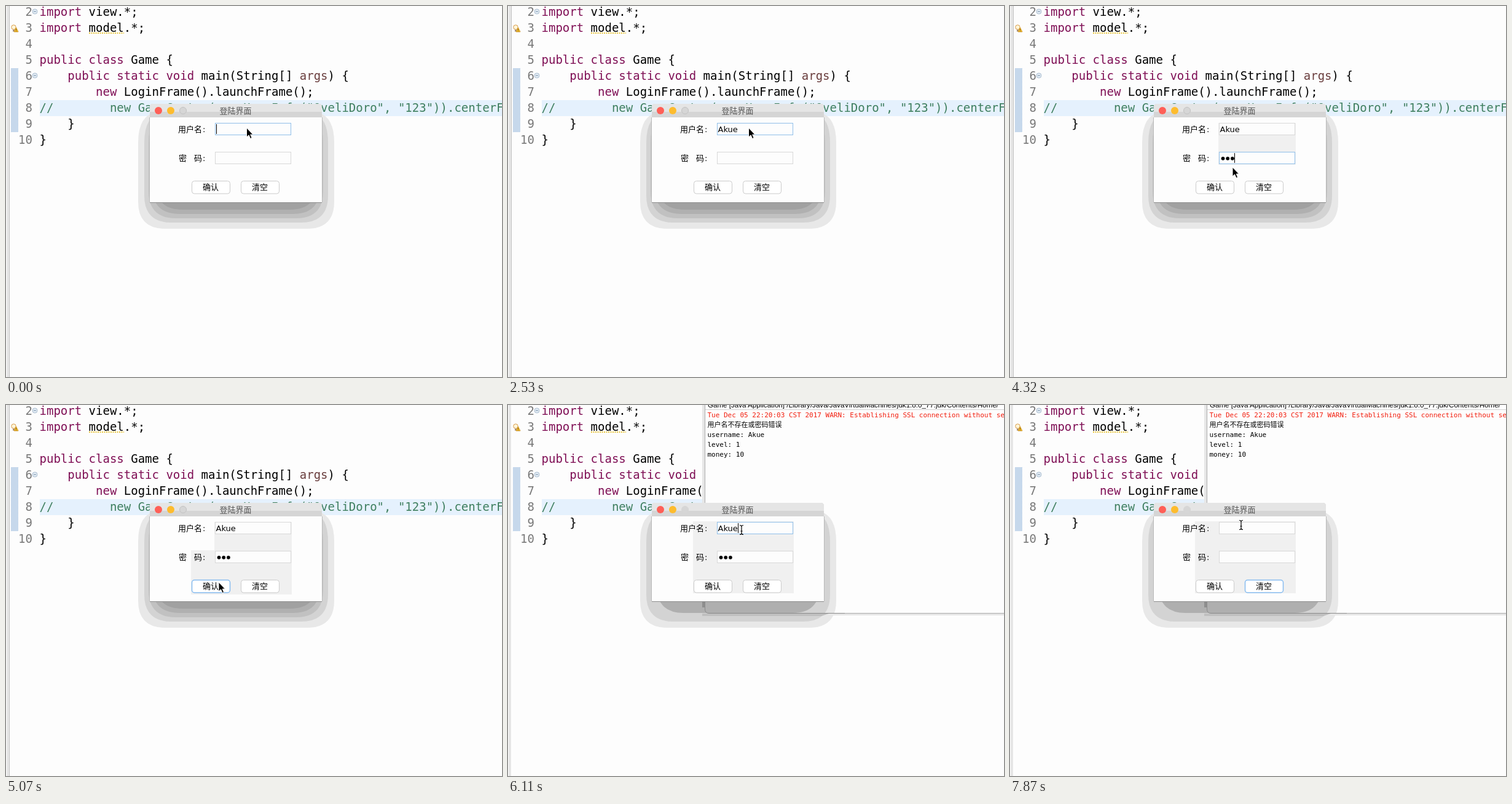
Recreate the animation shown at these times as an HTML page. Size 807 px wide and 603 px high, loop 8000 ms.

```html
<!DOCTYPE html>
<html lang="zh">
<head>
<meta charset="utf-8">
<title>Login dialog</title>
<style>
  html, body { margin: 0; width: 100%; height: 100%; overflow: hidden; background: #fdfdfd; }
  svg { display: block; width: 807px; height: 603px; }
  text { white-space: pre; }
  .code { font: 19px "DejaVu Sans Mono", monospace; fill: #000; }
  .num { fill: #787878; text-anchor: end; }
  .key { fill: #7f0f55; }
  .arg { fill: #6a3e3e; }
  .note { fill: #3f7f5f; }
  .log { font: 11px "DejaVu Sans Mono", "Noto Sans CJK SC", monospace; }
  .path { font: 11.6px "Liberation Sans", sans-serif; }
  .ui { font: 13px "DejaVu Sans", "Noto Sans CJK SC", sans-serif; }
  .cjk { font: 13px "Noto Sans CJK SC", "Noto Sans CJK", sans-serif; }
  .mid { text-anchor: middle; }
  .field { fill: #fdfdfd; stroke: #d8d8d8; }
  .field.focus { stroke: #90bfe9; }
  .button { fill: #fff; stroke: #cbcbcb; }
  .button.focus { stroke: #86bcf0; stroke-width: 1.5; }
</style>
</head>
<body>
<svg viewBox="0 0 807 603">
  <defs>
    <pattern id="hatch" width="2" height="2" patternUnits="userSpaceOnUse">
      <path fill="#e0eaf5" d="M0 0h2v2H0z"/>
      <path fill="#acc6e2" d="M0 0h1v1H0zM1 1h1v1H1z"/>
    </pattern>
    <g id="fold">
      <circle r="4" fill="#e4edf5" stroke="#a9bccf"/>
      <path d="M-2 0H2" stroke="#6f8aa6"/>
    </g>
  </defs>

  <rect width="807" height="603" fill="#fdfdfd"/>
  <rect x="1" width="4" height="603" fill="#e6e6e6"/>
  <rect id="edge" x="5" width="1" height="603" fill="#c2c2c2"/>
  <rect x="8" y="101" width="12" height="104" fill="url(#hatch)"/>
  <rect x="55" y="153" width="752" height="26" fill="#e5f1fd"/>
  <g id="code"></g>
  <path d="M135 44H192" stroke="#e8c53c" stroke-width="2" stroke-dasharray="2 1.5"/>
  <use href="#fold" x="47" y="9"/>
  <use href="#fold" x="47" y="113"/>
  <g transform="translate(8 30)">
    <circle cx="4.500" cy="4.500" r="3.700" fill="#fff6d8" stroke="#d99a4a"/>
    <path d="M3 8.500h3v3h-3z" fill="#a98e78"/>
    <path d="M8.500 5L12 12H5Z" fill="#f6c22f" stroke="#c48713" stroke-width=".8"/>
    <path d="M8.500 7.500v2M8.500 10.500v1" stroke="#6a4a00"/>
  </g>

  <g id="console">
    <path d="M316 0H807V342H316Z" fill="#e6e6e6"/>
    <path d="M320.500 -1V332Q320.500 338.500 327 338.500H808V-1Z" fill="#fdfdfd" stroke="#adadad"/>
    <text class="path" x="325" y="4">Game [Java Application] /Library/Java/JavaVirtualMachines/jdk1.8.0_77.jdk/Contents/Home/</text>
    <path d="M321 7.500H807" stroke="#d4d4d4"/>
    <g id="log"></g>
  </g>

  <g id="shadow"></g>
  <g id="overlap">
    <path d="M316 319h4v10h-4z" fill="#8e8e8e"/>
    <path d="M320.500 319V332Q320.500 338.500 327 338.500H548" fill="none" stroke="#8c8c8c"/>
    <path d="M316 339H522L510 343H316Z" fill="#bfbfbf"/>
  </g>

  <path d="M234 319V164Q234 159 239 159H509Q514 159 514 164V319Z" fill="#fdfdfd"/>
  <path d="M234 181V164Q234 159 239 159H509Q514 159 514 164V181Z" fill="#d5d5d5"/>
  <path d="M234 172V164Q234 159 239 159H509Q514 159 514 164V172Z" fill="#e5e5e5"/>
  <path d="M234 319.500H514" stroke="#8d8d8d"/>
  <path d="M233.500 181V319M514.500 181V319" stroke="#b9b9b9"/>
  <circle cx="248" cy="170" r="6" fill="#ff5f57"/>
  <circle cx="268" cy="170" r="6" fill="#fdbc2e"/>
  <circle id="zoom" cx="288" cy="170" r="5.500" fill="#d6d6d6" stroke="#c2c2c2"/>
  <text class="cjk mid" x="373.500" y="175" fill="#555">登陆界面</text>

  <path id="patch" fill="#f0f0f0"/>
  <text class="cjk" x="280" y="205">用户名</text>
  <text class="cjk" x="281" y="252">密</text>
  <text class="cjk" x="306" y="252">码</text>
  <text class="ui" x="320" y="205">:</text>
  <text class="ui" x="320" y="252">:</text>
  <rect id="user" class="field" x="340.500" y="190.500" width="123" height="19"/>
  <rect id="pass" class="field" x="340.500" y="237.500" width="123" height="19"/>
  <rect id="ok" class="button" x="302.500" y="284.500" width="62" height="20.500" rx="4"/>
  <rect id="clear" class="button" x="382.500" y="284.500" width="62" height="20.500" rx="4"/>
  <text class="cjk mid" x="333" y="299">确认</text>
  <text class="cjk mid" x="413" y="299">清空</text>
  <text id="name" class="ui" x="341.500" y="205"></text>
  <g id="dots">
    <circle cx="346.500" cy="247.800" r="2.900"/>
    <circle cx="354.200" cy="247.800" r="2.900"/>
    <circle cx="361.900" cy="247.800" r="2.900"/>
  </g>
  <rect id="caret" width="1" height="16"/>
  <path id="arrow" d="M0 0V15L3.600 11.800L6 17.500L8.600 16.400L6.200 11H10.500Z" stroke="#fff"/>
  <path id="beam" d="M-3 -7.500Q0 -7.500 0 -5.500Q0 -7.500 3 -7.500M0 -5.500V5.500M-3 7.500Q0 7.500 0 5.500Q0 7.500 3 7.500M-1.500 2H1.500" fill="none" stroke="#000" stroke-width="1.200"/>
</svg>

<script>
const LOOP = 8000, USER = "Akue";
const $ = id => document.getElementById(id);
const show = (id, on) => $(id).style.display = on ? "" : "none";

// Token marks: {k keyword}, {a argument}, {n comment}
const code = [
  "{kimport} view.*;", "{kimport} model.*;", "", "{kpublic class} Game {",
  "    {kpublic static void} main(String[] {aargs}) {",
  "        {knew} LoginFrame().launchFrame();",
  '{n//        new GameCenter(new UserInfo("OveliDoro", "123")).centerFrame();}',
  "    }", "}"
];
const kinds = { k: "key", a: "arg", n: "note" };
$("code").innerHTML = code.map((line, i) => {
  const y = 16 + i * 26;
  const body = line.replace(/\{([kan])([^}]+)\}/g, (_, k, s) => `<tspan class="${kinds[k]}">${s}</tspan>`);
  return `<text class="code num" x="43" y="${y}">${i + 2}</text><text class="code" x="54.5" y="${y}">${body}</text>`;
}).join("");

$("log").innerHTML = [
  "Tue Dec 05 22:20:03 CST 2017 WARN: Establishing SSL connection without server's",
  "用户名不存在或密码错误", "username: " + USER, "level: 1", "money: 10"
].map((s, i) => `<text class="log" x="324.500" y="${20 + i * 16}" fill="${i ? "#000" : "#f21d0d"}">${s}</text>`).join("");

// Shadow bands: left, right, bottom, colour
const outer = [[215, 534, 362, "#e8e8e8"], [225, 524, 352, "#d3d3d3"]];
const deep = [[232, 516, 345, "#c1c1c1"], [238, 511, 338, "#b0b0b0"], [243, 506, 331, "#a1a1a1"]];
const flat = [[242, 507, 338, "#afafaf"]];
const bands = list => list.map(([l, r, b, fill]) =>
  `<path fill="${fill}" d="M${l} 222Q${l} 176 ${l + 32} 172H${r - 32}Q${r} 176 ${r} 222V${b - 44}Q${r} ${b} ${r - 44} ${b}H${l + 44}Q${l} ${b} ${l} ${b - 44}Z"/>`).join("");
const shadows = { false: bands([...outer, ...deep]), true: bands([...outer, ...flat]) };

const arrow = (x, y) => ({ pointer: "arrow", x, y });
const beam = (x, y) => ({ pointer: "beam", x, y });

// Grey repaint areas behind the controls
const fields = "M339 190h126v68h-126z";
const lower = "M301 236h164v72h-164z";
const whole = "M301 189h164v117h-164z";

// Each step overrides part of the state from its time on
const steps = [
  [0, { typed: 0, dots: 0, focus: "user", caret: true, patch: "", console: false, ...arrow(391.5, 198) }],
  [450, { caret: false }],
  [1050, { caret: true }],
  [1490, { typed: 1 }],
  [1790, { typed: 2 }],
  [1940, { typed: 3 }],
  [2080, { typed: 4 }],
  [2530, { caret: false }],
  [2680, { focus: "pass", caret: true, patch: fields }],
  [3130, { caret: false }],
  [3580, { dots: 1, caret: true }],
  [3720, { dots: 2 }],
  [4020, { dots: 3 }],
  [4170, arrow(384, 222)],
  [4320, arrow(362, 262)],
  [4470, arrow(348, 286)],
  [4620, { focus: "ok", caret: false, patch: fields + lower, ...arrow(346, 288) }],
  [5220, { console: true, patch: "", ...arrow(343, 288) }],
  [5370, arrow(345, 284)],
  [5520, arrow(355, 263)],
  [5670, arrow(368, 228)],
  [5820, beam(378, 206)],
  [5970, beam(380, 203)],
  [6110, { focus: "user", caret: true, patch: whole }],
  [6250, beam(381, 204)],
  [6400, beam(383, 207)],
  [6540, { caret: false, ...arrow(386, 220) }],
  [6690, arrow(393, 243)],
  [6840, arrow(400, 266)],
  [6980, arrow(406, 283)],
  [7130, arrow(409, 290)],
  [7270, arrow(409, 291)],
  [7420, { typed: 0, dots: 0, focus: "clear" }],
  [7570, arrow(402, 268)],
  [7720, arrow(386, 219)],
  [7870, beam(376, 195)]
];

let lastState = "";
function draw(now) {
  const time = now % LOOP;
  const s = Object.assign({}, ...steps.filter(([t]) => t <= time).map(step => step[1]));
  const key = JSON.stringify(s);
  if (key === lastState) return;
  lastState = key;

  $("name").textContent = USER.slice(0, s.typed);
  [...$("dots").children].forEach((dot, i) => dot.style.display = i < s.dots ? "" : "none");
  for (const id of ["user", "pass", "ok", "clear"]) $(id).classList.toggle("focus", s.focus === id);
  $("patch").setAttribute("d", s.patch);

  const inUser = s.focus === "user";
  const offset = inUser ? (s.typed ? $("name").getComputedTextLength() : 0) : s.dots * 7.8;
  $("caret").setAttribute("x", Math.round(342 + offset));
  $("caret").setAttribute("y", inUser ? 192 : 239);
  show("caret", s.caret);

  show("console", s.console);
  show("overlap", s.console);
  show("edge", !s.console);
  $("zoom").setAttribute("stroke", s.console ? "#d6d6d6" : "#c2c2c2");
  $("shadow").innerHTML = shadows[s.console];

  for (const id of ["arrow", "beam"]) show(id, s.pointer === id);
  $(s.pointer).setAttribute("transform", `translate(${s.x} ${s.y})`);
}

const start = performance.now();
function tick() {
  draw(performance.now() - start);
  requestAnimationFrame(tick);
}
tick();
</script>
</body>
</html>
```
